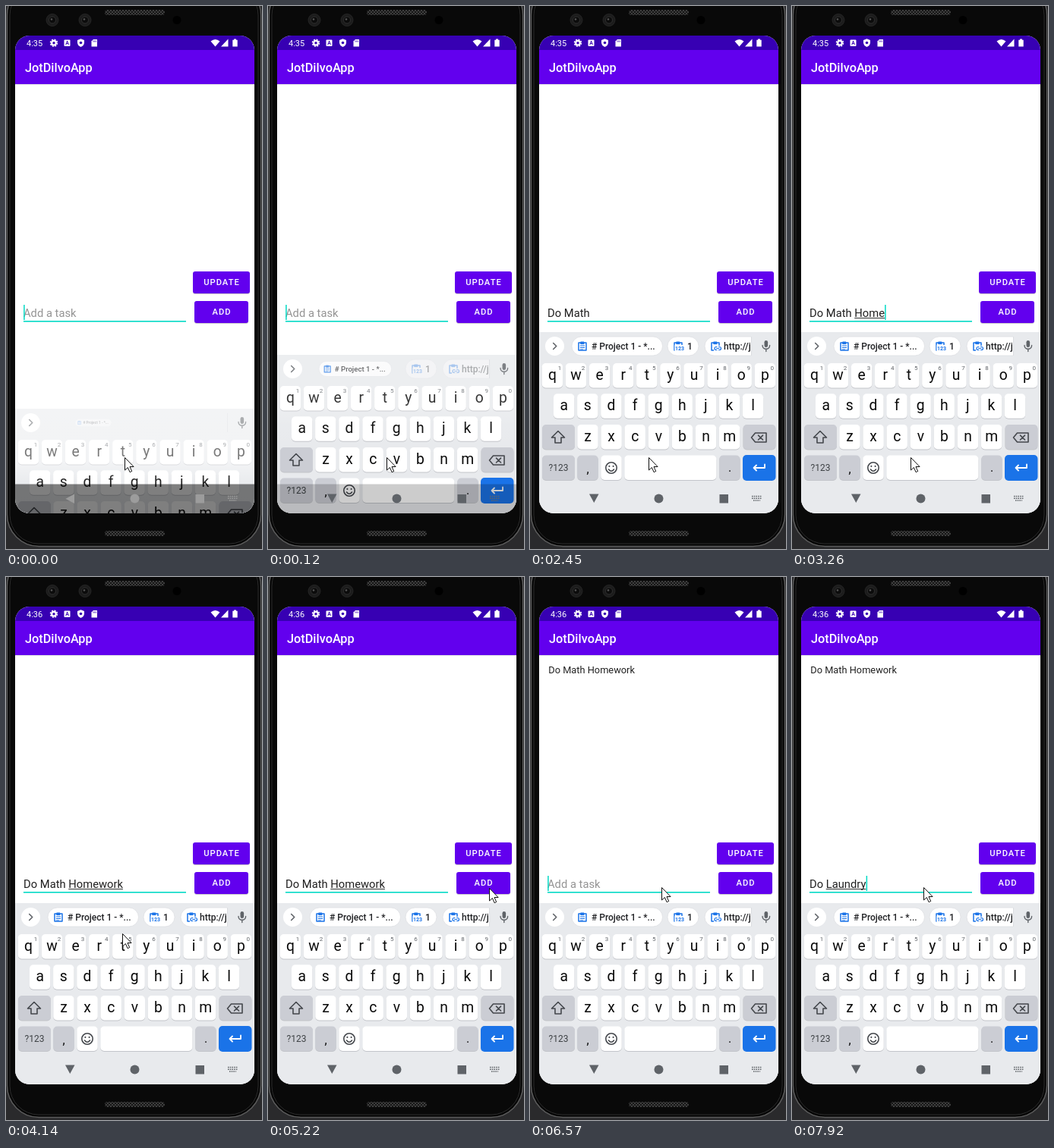
An HTML page for the animation above (8000 ms loop, 337 by 716 pixels).

```html
<!DOCTYPE html>
<html lang="en">
<head>
<meta charset="utf-8">
<title>Task list demo</title>
<style>
html, body { margin: 0; width: 100%; height: 100%; overflow: hidden; background: #0b0b0b; }
svg { display: block; width: 100vw; height: 100vh; }
text { font-family: Roboto, sans-serif; white-space: pre; }
.mid { text-anchor: middle; }
.btn { font-size: 11.2px; font-weight: 500; letter-spacing: 1px; fill: #fff; }
.key { font-size: 19.3px; fill: #0a0a0a; text-anchor: middle; }
.hint { font-size: 8px; fill: #5f6368; text-anchor: middle; }
.chip { font-size: 12px; font-weight: 500; fill: #202124; }
.line { fill: none; stroke-linecap: round; stroke-linejoin: round; }
</style>
</head>
<body>
<svg viewBox="0 0 337 716">
  <defs>
    <clipPath id="screen"><rect x="12" y="39" width="315" height="630" rx="19"/></clipPath>
    <clipPath id="addClip"><rect x="248" y="389" width="71" height="29" rx="3"/></clipPath>
    <clipPath id="chipClip"><rect x="45" y="430" width="246" height="36"/></clipPath>
    <pattern id="mesh" width="4" height="4" patternUnits="userSpaceOnUse">
      <rect width="4" height="4" fill="#161616"/>
      <path d="M0 0L4 4M4 0L0 4" stroke="#4a4a4a" stroke-width=".8"/>
    </pattern>
    <linearGradient id="haze" gradientUnits="userSpaceOnUse" x1="0" y1="430" x2="0" y2="560">
      <stop offset="0" stop-color="#fff" stop-opacity=".48"/>
      <stop offset=".55" stop-color="#fff" stop-opacity=".45"/>
      <stop offset=".72" stop-color="#fff" stop-opacity=".12"/>
      <stop offset="1" stop-color="#fff" stop-opacity="0"/>
    </linearGradient>
    <g id="clip" class="line" stroke="#1a73e8" stroke-width="1.5">
      <path d="M3.500 2H1V12H11V2H8.500"/>
      <path d="M4 1H8V3.600H4Z" fill="#1a73e8" stroke-width="1"/>
    </g>
  </defs>

  <g id="phone">
    <rect width="337" height="716" fill="#2a2a2c"/>
    <rect x="1.500" y="-30" width="334" height="742.500" rx="42" fill="#060606" stroke="#5c5c5c" stroke-width="1.500"/>
    <rect x="5" y="-26" width="327" height="735" rx="38" fill="#090909" stroke="#2c2c2c"/>
    <rect x="130" y="5" width="79" height="7" rx="3.500" fill="url(#mesh)"/>
    <rect x="130" y="692" width="79" height="7" rx="3.500" fill="url(#mesh)"/>
    <g id="lenses"></g>
    <circle cx="225" cy="18.500" r="5.500" fill="#000"/>
  </g>

  <g clip-path="url(#screen)">
    <rect x="12" y="39" width="315" height="630" fill="#fff"/>
    <rect x="12" y="103" width="315" height="1" fill="#000" opacity=".1"/>
    <rect x="12" y="58" width="315" height="45" fill="#6200ee"/>
    <rect x="12" y="39" width="315" height="19" fill="#3700b3"/>
    <g fill="#fff">
      <text id="clock" x="27" y="52.700" font-size="11"></text>
      <circle cx="63" cy="48.700" r="2.800" fill="none" stroke="#fff" stroke-width="2.200"/>
      <circle cx="63" cy="48.700" r="4.500" fill="none" stroke="#fff" stroke-width="1.500" stroke-dasharray="2 1.534"/>
      <rect x="76.500" y="44.500" width="8" height="8.500" rx="1"/>
      <text class="mid" x="80.500" y="51.300" font-size="7" font-weight="700" style="fill:#3700b3">A</text>
      <path d="M98.500 43.300L103 45V48.500Q102.500 52.500 98.500 54Q94.500 52.500 94 48.500V45Z"/>
      <circle cx="98.500" cy="48.500" r="1.800" fill="#3700b3"/>
      <path d="M115 44H120V53.500H112.500V46.500Z"/>
      <path d="M115 45.500V47.500M116.700 45.500V47.500M118.400 45.500V47.500" stroke="#3700b3" stroke-width=".8"/>
      <path d="M269.500 46.500Q275.500 41.500 281.500 46.500L275.500 53.500Z"/>
      <path d="M292.500 43.500V53.500H283Z"/>
      <path d="M300 43.500H303V44.700H304.700V53.500H298.300V44.700H300Z"/>
      <text x="25" y="87" font-size="16.300" font-weight="500">JotDilvoApp</text>
    </g>

    <text id="item" x="24.300" y="127" font-size="12.800" fill="#212121">Do Math Homework</text>
    <g id="buttons"></g>
    <circle id="ripple" cx="291" cy="409" fill="#fff" clip-path="url(#addClip)"/>

    <rect x="23" y="415" width="214" height="1.600" fill="#03dac5"/>
    <text id="field" x="23" y="410" font-size="14.750"></text>
    <rect id="mark" y="411" height="1" fill="#333"/>
    <rect id="caret" y="394" width="1.500" height="20" fill="#03dac5"/>

    <g id="board">
      <rect x="12" y="430" width="315" height="350" fill="#e8eaed"/>
      <circle cx="32.500" cy="448.500" r="12.500" fill="#fff"/>
      <path class="line" d="M30.700 444.500L34.700 448.500L30.700 452.500" stroke="#5f6368" stroke-width="1.600"/>
      <g clip-path="url(#chipClip)">
        <g id="chip1">
          <rect x="55" y="436" width="119.500" height="25" rx="12.500" fill="#fff" stroke="#dadce0" stroke-width=".7"/>
          <use href="#clip" x="63" y="442"/>
          <path d="M66 448H72M66 450.500H72M66 453H70" stroke="#1a73e8"/>
          <text class="chip" x="81" y="453"># Project 1 - *...</text>
        </g>
        <g id="chips">
          <rect x="181" y="436" width="41" height="25" rx="12.500" fill="#fff" stroke="#dadce0" stroke-width=".7"/>
          <use href="#clip" x="189" y="442"/>
          <rect x="190.500" y="447" width="13" height="8" fill="#fff"/>
          <text x="191" y="454" font-size="7" font-weight="700" fill="#1a73e8">123</text>
          <text class="chip" x="207" y="453">1</text>
          <rect x="230" y="436" width="90" height="25" rx="12.500" fill="#fff" stroke="#dadce0" stroke-width=".7"/>
          <use href="#clip" x="238" y="442"/>
          <rect x="242" y="448" width="10" height="7" fill="#fff"/>
          <path class="line" d="M246 449.500H245A2 2 0 0 0 245 453.500H246M248.500 449.500H249.500A2 2 0 0 1 249.500 453.500H248.500M245.500 451.500H249" stroke="#1a73e8" stroke-width="1.200"/>
          <text class="chip" x="255" y="453">http://j</text>
        </g>
      </g>
      <path d="M291.500 436V461" stroke="#dadce0"/>
      <rect x="308.500" y="441" width="4.600" height="9" rx="2.300" fill="#5f6368"/>
      <path class="line" d="M306 447.500A4.800 4.800 0 0 0 315.600 447.500M310.800 452.500V455.500" stroke="#5f6368" stroke-width="1.400"/>
      <g id="keys"></g>
      <g class="line" stroke="#44474c" stroke-width="1.600">
        <path d="M37 560.500L45.500 569H41V576H33V569H28.500Z"/>
        <path d="M296.500 563H311V575H296.500L291.500 569ZM300.500 566.200L306.500 572M306.500 566.200L300.500 572"/>
        <circle cx="107" cy="609" r="7.200"/>
        <path d="M103.500 611Q107 615.500 110.500 611"/>
        <path d="M104.400 606.800V607M109.600 606.800V607" stroke-width="2"/>
        <path d="M309 604.500V609H294.500M298 605.500L294.500 609L298 612.500" stroke="#fff" stroke-width="1.800"/>
      </g>
      <rect id="veil" x="12" y="430" width="315" height="130" fill="url(#haze)"/>
    </g>

    <rect id="scrim" x="12" y="630.500" width="315" height="38.500" fill="#000"/>
    <g id="nav">
      <path id="back" d="M78 643.500H90.500L84.250 655Z"/>
      <circle cx="169.500" cy="649.500" r="6"/>
      <rect x="249.500" y="644" width="11.500" height="11.500"/>
      <path d="M292 646.500H305M292 649.200H305M294 652H303" fill="none" id="dots" stroke-width="1.600" stroke-dasharray="1.600 1.100"/>
    </g>
  </g>
  <path id="mouse" d="M0 0V16.500L3.900 13L6.600 19.200L9.200 18L6.500 12H11.600Z" fill="#fff" stroke="#111" stroke-linejoin="round"/>
</svg>
<script>
const LOOP = 8000;
const el = id => document.getElementById(id);
const set = (node, attrs) => { for (const k in attrs) node.setAttribute(k, attrs[k]); };
const rect = (x, y, w, h, r, fill) =>
  `<rect x="${x}" y="${y}" width="${w}" height="${h}" rx="${r}" fill="${fill}"/>`;
const label = (cls, x, y, s, extra = '') => `<text class="${cls}" x="${x}" y="${y}" ${extra}>${s}</text>`;

// Static parts
const key = (x, y, w, fill = '#fff') =>
  rect(x, y + 1, w, 32.5, 5, '#c3c5ca') + rect(x, y, w, 32.5, 5, fill);

function row(chars, cx, y, numbered) {
  return [...chars].map((c, i) => {
    const x = cx + i * 31.1;
    return key(x - 13.7, y, 27.4) + label('key', x, y + 21.5, c) +
      (numbered ? label('hint', x + 9.5, y + 9, (i + 1) % 10) : '');
  }).join('');
}

const GRAY = '#cbcdd4';
el('keys').innerHTML =
  row('qwertyuiop', 29.4, 471, true) + row('asdfghjkl', 44.7, 511.3) + row('zxcvbnm', 76, 552) +
  key(16, 552, 43, GRAY) + key(280.5, 552, 43, GRAY) +
  key(16, 592.5, 43, GRAY) + key(62.3, 592.5, 27.4, GRAY) + key(93.3, 592.5, 27.4) +
  key(124.3, 592.5, 121) + key(249.2, 592.5, 27.4, GRAY) + rect(280, 592, 43.5, 34, 5, '#1a73e8') +
  label('key', 37.5, 613, '?123', 'style="font-size:12px;fill:#3c4043"') +
  label('key', 76, 616, ',', 'style="font-size:16px"') + label('key', 263, 614, '.', 'style="font-size:16px"');

const button = (x, y, w, s) =>
  rect(x, y + 1, w, 29, 3, 'rgba(0,0,0,.2)') + rect(x, y, w, 29, 3, '#6200ee') +
  label('btn mid', x + w / 2 + .5, y + 18.4, s);
el('buttons').innerHTML = button(246, 350, 75, 'UPDATE') + button(248, 389, 71, 'ADD');

el('lenses').innerHTML = [61, 104].map(x =>
  `<circle cx="${x}" cy="18.500" r="8" fill="#1c1c1c" stroke="#262626"/>
   <circle cx="${x}" cy="18.500" r="4.500" fill="#0c0c0c" stroke="#303030"/>
   <circle cx="${x - 1}" cy="17.500" r="1.300" fill="#555"/>`).join('');

// Timelines: each entry holds from its time until the next one
const typing = (base, word, start, gap) =>
  [...word].map((_, i) => [start + i * gap, base + word.slice(0, i + 1)]);

const TEXT = [
  [0, ''], [670, 'D'], [800, 'Do'], [1080, 'Do '],
  ...typing('Do ', 'Math', 1200, 130), [1870, 'Do Math '],
  ...typing('Do Math ', 'Homework', 2720, 137),
  [5760, ''], ...typing('', 'Do ', 6720, 136), ...typing('Do ', 'La', 7130, 135),
  [7540, 'Do Lau'], [7680, 'Do Laun'], [7800, 'Do Laund'], [7920, 'Do Laundry']
];
const MOUSE = [
  [0, 156, 595], [3990, 157, 602], [4140, 153, 470], [4260, 163, 448], [4400, 194, 436],
  [4540, 232, 428], [4680, 263, 422], [4820, 284, 418], [4950, 291, 417], [5100, 291, 413],
  [5220, 291, 410], [5890, 284, 409], [6020, 235, 409], [6140, 190, 409], [6270, 173, 409]
];
// offset, veil, first chip scale, other chips opacity, scrim
const BOARD = [[0, 101, 1, .4, 0, .5], [120, 30, .4, .8, .4, .2], [250, 4, 0, 1, .9, 0], [380, 0, 0, 1, 1, 0]];
// radius, opacity
const RIPPLE = [[0, 0, 0], [5640, 22, .24], [5760, 44, .24], [5890, 70, .16], [6020, 70, .07], [6140, 0, 0]];
const CARET_OFF = [[250, 670], [2450, 2720], [4140, 4540], [5100, 5760], [6140, 6570]];

const at = (list, t) => list.findLast(e => e[0] <= t);

const pen = document.createElement('canvas').getContext('2d');
const width = s => {
  pen.font = '14.75px Roboto, sans-serif';
  return pen.measureText(s).width;
};

function drawField(t) {
  const s = at(TEXT, t)[1];
  const field = el('field');
  field.textContent = s || 'Add a task';
  field.setAttribute('fill', s ? '#212121' : '#949494');

  const word = s.trimEnd();
  const from = width(word.slice(0, word.lastIndexOf(' ') + 1));
  const settled = t >= 1990 && t < 2720;
  set(el('mark'), { x: 23 + from, width: settled ? 0 : width(word) - from });

  const off = CARET_OFF.some(([a, b]) => t >= a && t < b);
  set(el('caret'), { x: 23.2 + width(s), opacity: off ? 0 : 1 });
}

function drawBoard(t) {
  const [, dy, veil, scale, rest, dim] = at(BOARD, t);
  el('board').setAttribute('transform', `translate(0 ${dy})`);
  el('veil').setAttribute('opacity', veil);
  set(el('chip1'), {
    transform: `translate(115 448.500) scale(${scale}) translate(-115 -448.500)`, opacity: scale
  });
  el('chips').setAttribute('opacity', rest);
  el('scrim').setAttribute('opacity', dim);
  const tint = dim > .3 ? '#9c9c9c' : '#5f6368';
  el('nav').setAttribute('fill', tint);
  el('dots').setAttribute('stroke', tint);
  el('back').setAttribute('transform', t < 120 ? 'rotate(90 84 649.500)' : '');
}

function draw(t) {
  drawField(t);
  drawBoard(t);
  el('clock').textContent = t < 3268 ? '4:35' : '4:36';
  el('item').setAttribute('opacity', t < 5760 ? 0 : 1);
  const [, r, glow] = at(RIPPLE, t);
  set(el('ripple'), { r, opacity: glow });
  const [, x, y] = at(MOUSE, t);
  el('mouse').setAttribute('transform', `translate(${x + .5} ${y + .5})`);
}

const start = performance.now();
function tick() {
  draw((performance.now() - start) % LOOP);
  requestAnimationFrame(tick);
}
tick();
</script>
</body>
</html>
```
